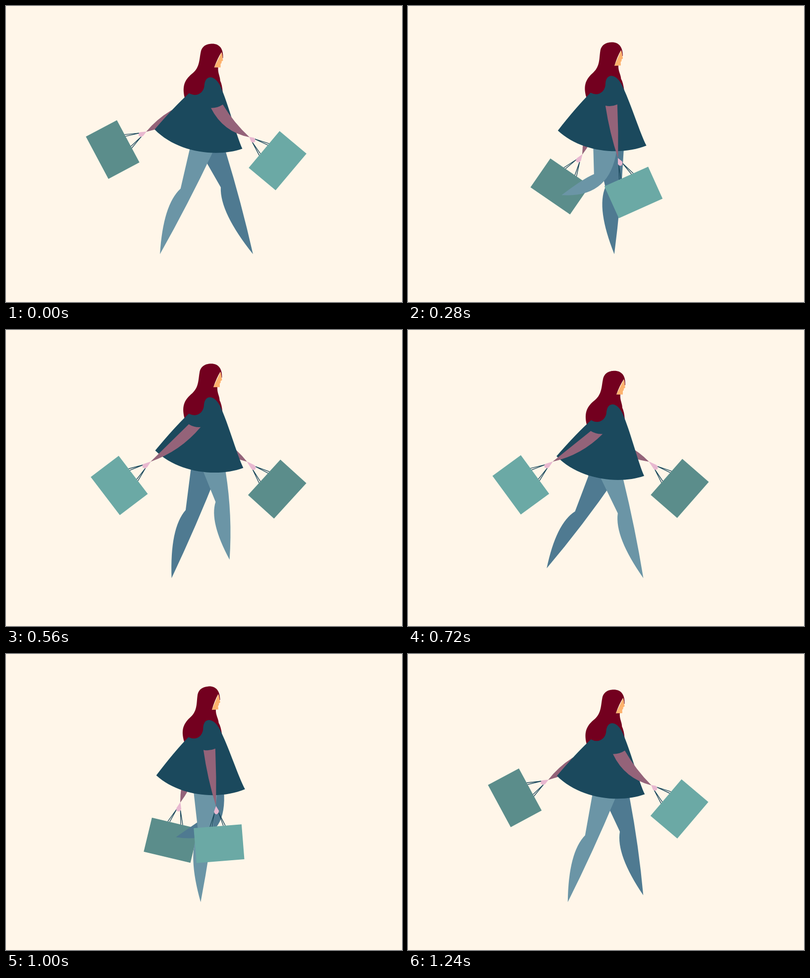
These frames come from a looping animation (800 px wide and 600 px high, 1.28 s). An HTML page with a canvas:

```html
<!DOCTYPE html>
<html lang="en">
<head>
<meta charset="utf-8">
<title>Walk cycle</title>
<style>
html, body { margin: 0; width: 100%; height: 100%; overflow: hidden; background: #fff6e9; }
canvas { display: block; }
</style>
</head>
<body>
<canvas width="800" height="600"></canvas>
<script>
const LOOP = 1280, HALF = LOOP / 2, STEP = 40, BAG_LAG = 25;
const { PI, sin, cos, abs, hypot, floor } = Math;
const ctx = document.querySelector('canvas').getContext('2d');
const color = {
  ground: '#fff6e9', dress: '#1b495d', hair: '#73001f', skin: '#fdb26d', sleeve: '#946379', hand: '#e8b8d0',
  nearLeg: '#6b95a6', farLeg: '#4f7a91', nearBag: '#6ba9a5', farBag: '#5b8d8b'
};

const head = new Path2D('M437 93Q438 100 438 106L439 111 436 113 436 116 434 118 434 125 421 125Z');
const hair = new Path2D(`M361 186C355 160 363 148 378 136C392 124 391 108 394 94C397 80 408 77 417 77
  C432 77 440 87 439 106L438 106Q438 98 436 94Q428 106 421 125L429 125C428 137 433 143 433 152Q437 160 438 176L400 200Z`);
const dress = new Path2D(`M300 250Q339 205 370 177Q384 185 395 175Q401 168 401 160Q403 145 414 145
  Q428 147 437 172C451 207 466 266 477 290C425 308 345 297 300 250Z`);

const mix = (a, b, k) => a + (b - a) * k;
const wave = (time, peak) => cos(2 * PI * (time - peak) / HALF); // one cycle per step

// Arm swing: 0 at the start of the loop, 1 half way through, with a strong ease at both ends
function swing(time) {
  const u = 1 - abs(1 - (time + LOOP) % LOOP / HALF), a = u ** 2.7, b = (1 - u) ** 2.7;
  return a / (a + b);
}

// Control point beside the line a-b: `bulge` px sideways, `shift` of its length along
function beside([ax, ay], [bx, by], bulge, shift = 0) {
  const dx = bx - ax, dy = by - ay, len = hypot(dx, dy);
  return [(ax + bx) / 2 - bulge * dy / len + shift * dx, (ay + by) / 2 + bulge * dx / len + shift * dy];
}

// Closed shape; each part is a point, or a control point with an end point
function fillShape(fill, start, ...parts) {
  ctx.beginPath();
  ctx.moveTo(...start);
  for (const [a, b, c, d] of parts) c === undefined ? ctx.lineTo(a, b) : ctx.quadraticCurveTo(a, b, c, d);
  ctx.fillStyle = fill;
  ctx.fill();
}

// In the first half of its cycle a leg swings forward, in the second the foot slides back on the ground
function drawLeg(time, bob, width, fill) {
  const phase = time % LOOP / HALF, u = phase % 1, swinging = phase < 1;
  const forward = swinging ? u : 1 - u;
  const lift = swinging ? sin(PI * u ** 1.15) ** 1.5 : 0, flex = lift * lift;
  const trail = swinging ? 84 * sin(PI * u ** .72) : 0;
  const sway = swinging ? 13 * sin(2 * PI * u) : 0;

  const back = [mix(371, 390, forward) - sway, 291 + bob], front = [back[0] + width, 296 + bob];
  const foot = [mix(311, 499, forward) - trail, 503 - 132 * lift];
  const hollow = beside(back, foot, -4 - 32 * flex, -.13);
  fillShape(fill, back, hollow,
    [...beside(hollow, foot, 24 * (1 - flex), -.2), ...foot],
    [...beside(front, foot, -4 - 75 * flex), ...front],
    [front[0], front[1] - 20], [back[0], back[1] - 20]);
}

// Bag with its handles and the hand, hanging from the wrist
function drawBag([x, y], angle, drop, fill) {
  const grip = drop - 28;
  ctx.save();
  ctx.translate(x, y);
  ctx.rotate(-angle * PI / 180);
  ctx.fillStyle = fill;
  ctx.fillRect(-48.5, drop, 97, 71);
  ctx.strokeStyle = color.dress;
  ctx.lineWidth = 1.4;
  ctx.beginPath();
  for (const side of [-1, 1]) for (const end of [11.5, 15.5]) {
    ctx.moveTo(side * 4, grip);
    ctx.lineTo(side * end, drop);
  }
  ctx.stroke();
  fillShape(color.hand, [0, -1], [-5, grip - 2], [-4, grip + 2], [0, grip + 4], [4, grip + 1], [5, grip - 3]);
  ctx.restore();
}

function drawFarArm(time, bob) {
  const k = swing(time);
  const wrist = [mix(283, 488, k), mix(255, 266, k) + 190 * k * (1 - k)];
  const shoulder = [390, mix(190, 212, k) + bob];
  const bulge = hypot(wrist[0] - shoulder[0], wrist[1] - shoulder[1]) * .17;
  fillShape(color.sleeve, wrist,
    [...beside(wrist, shoulder, bulge), ...shoulder],
    [...beside(wrist, shoulder, -bulge), ...wrist]);
  drawBag(wrist, mix(-62, 49, swing(time - BAG_LAG)), mix(41, 47, k), color.farBag);
}

function drawNearArm(time, bob) {
  const k = swing(time);
  const wrist = [mix(492, 291, k), 266 + 192 * k * (1 - k)];
  const back = [mix(414, 369, k), mix(207, 199, k) + bob];
  const front = [back[0] + 24, back[1] + mix(-7, 6, k)];
  fillShape(color.sleeve, back,
    [...beside(back, front, 4), ...front],
    [...beside(front, wrist, mix(6, -17, k)), ...wrist],
    [...beside(back, wrist, 24 * (1 - k) ** 4), ...back]);
  drawBag(wrist, mix(50, -54, swing(time - BAG_LAG)), mix(38.5, 44, k), color.nearBag);
}

function drawBody(bob, lean) {
  ctx.save();
  ctx.translate(390, 200 + bob);
  ctx.rotate(lean * PI / 180);
  ctx.translate(-390, -200);
  for (const [path, fill] of [[head, color.skin], [hair, color.hair], [dress, color.dress]]) {
    ctx.fillStyle = fill;
    ctx.fill(path);
  }
  ctx.restore();
}

function draw(now) {
  const time = floor(now / STEP) * STEP % LOOP;
  const bob = 10.3 * wave(time, 130) - 3.3, lean = 1.95 * (wave(time, 60) - 1);
  ctx.fillStyle = color.ground;
  ctx.fillRect(0, 0, 800, 600);
  drawFarArm(time, bob);
  drawLeg(time + HALF, bob, 54, color.farLeg);
  drawLeg(time, bob, 47, color.nearLeg);
  drawBody(bob, lean);
  drawNearArm(time, bob);
  requestAnimationFrame(draw);
}
requestAnimationFrame(draw);
</script>
</body>
</html>
```
